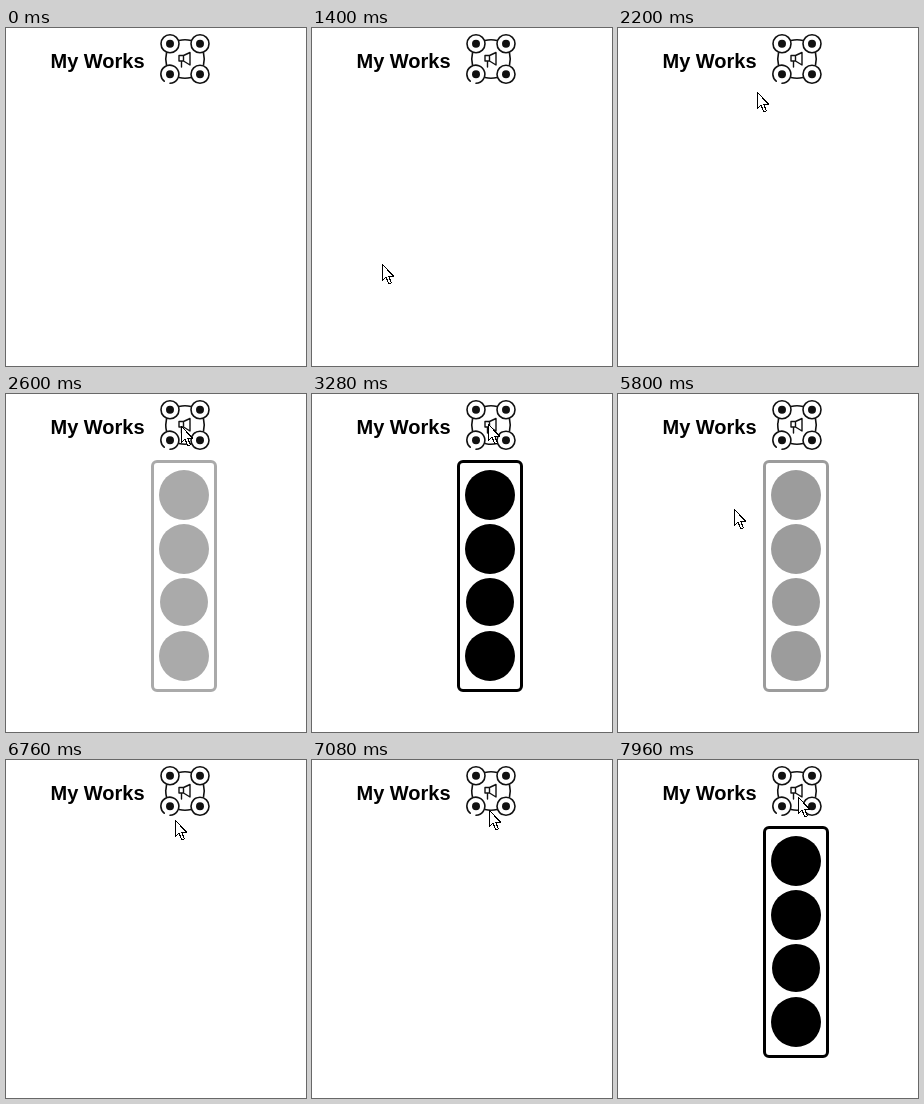
An HTML page that plays this animation: 300x338 px, repeating every 8 s.

```html
<!DOCTYPE html>
<html lang="en">
<head>
<meta charset="utf-8">
<title>My Works</title>
<style>
html, body { margin: 0; width: 100%; height: 100%; overflow: hidden; background: #fff; }
.stage { position: relative; width: 300px; height: 338px; overflow: hidden; }
.stage > * { position: absolute; }
h1 {
  left: 44.5px; top: 21px; margin: 0; white-space: nowrap;
  font: bold 20px/24px "Liberation Sans", Arial, sans-serif; color: #000;
}
.icon { left: 154px; top: 6px; }
.menu {
  left: 145px; top: 66px; width: 66px; height: 232px; box-sizing: border-box;
  border: 3px solid #000; border-radius: 6px; padding: 7px 5px;
  opacity: 0; animation: fade 8s infinite;
}
.menu i { display: block; width: 50px; height: 50px; margin-bottom: 4px; border-radius: 50%; background: #000; }
.menu i:nth-child(3) { width: 48px; height: 48px; margin: 1px 1px 5px; }
.cursor { left: 47px; top: 340px; animation: move 8s linear infinite; }

/* 0.7 s ease on hover and on leave */
@keyframes fade {
  0%, 30.62% { opacity: 0; animation-timing-function: ease; }
  39.37%, 69.41% { opacity: 1; animation-timing-function: ease; }
  78.16%, 88.94% { opacity: 0; animation-timing-function: ease; }
  97.69%, 100% { opacity: 1; }
}
@keyframes move {
  0%, 8.4% { left: 47px; top: 340px; }
  10.5% { left: 48px; top: 322px; }
  13.5% { left: 56px; top: 286px; }
  16% { left: 64px; top: 256px; }
  17.5% { left: 70px; top: 236px; }
  18.5% { left: 78px; top: 206px; }
  20.5% { left: 92px; top: 168px; }
  23% { left: 109px; top: 122px; }
  26% { left: 130px; top: 78px; }
  29% { left: 147px; top: 51px; }
  30.62% { left: 156px; top: 45px; }
  32.5% { left: 175px; top: 32px; }
  33.5%, 62.5% { left: 176px; top: 30px; }
  63% { left: 176px; top: 31px; }
  67% { left: 165px; top: 46px; }
  69.41% { left: 153px; top: 63px; }
  72.5% { left: 116px; top: 115px; }
  74% { left: 108px; top: 126px; }
  78%, 79.8% { left: 99px; top: 136px; }
  81.25% { left: 115px; top: 118px; }
  82.75% { left: 148px; top: 82px; }
  84.5% { left: 169px; top: 60px; }
  87.5% { left: 175px; top: 56px; }
  90% { left: 181px; top: 42px; }
  92.5% { left: 181px; top: 38px; }
  97.5%, 99.4% { left: 181px; top: 37px; }
  99.45%, 100% { left: 180px; top: 37px; }
}
</style>
</head>
<body>
<div class="stage">
  <h1>My Works</h1>

  <svg class="icon" width="50" height="50" fill="none" stroke="#111" stroke-width="1.6" stroke-linecap="round" stroke-linejoin="round">
    <path d="M19 6.5Q25 5 31 6.5M19 43.5Q25 45 31 43.5M6.5 19Q5 25 6.5 31M43.5 19Q45 25 43.5 31"/>
    <path stroke-width="1.4" d="M19 21.5H23.5L30 18.5V31L23.5 27H19ZM23.5 21.5V27M21.5 27V33"/>
    <g fill="#fff">
      <circle cx="10" cy="9.8" r="9"/>
      <circle cx="40" cy="9.8" r="9"/>
      <path d="M4.2 47.2A9 9 0 1 1 10 49.2M1.2 42.2A9 9 0 0 0 2 44.5"/>
      <circle cx="40" cy="40.2" r="9"/>
    </g>
    <g fill="#111" stroke="none">
      <circle cx="10" cy="9.8" r="4"/>
      <circle cx="40" cy="9.8" r="4"/>
      <circle cx="10" cy="40.2" r="4"/>
      <circle cx="40" cy="40.2" r="4"/>
    </g>
  </svg>

  <div class="menu"><i></i><i></i><i></i><i></i></div>

  <svg class="cursor" width="13" height="22" shape-rendering="crispEdges">
    <path d="M.5.5V16.5L4 13 6.9 20 9.4 19 6.8 12.3H11.6Z" fill="#fff" stroke="#000"/>
  </svg>
</div>
</body>
</html>
```
